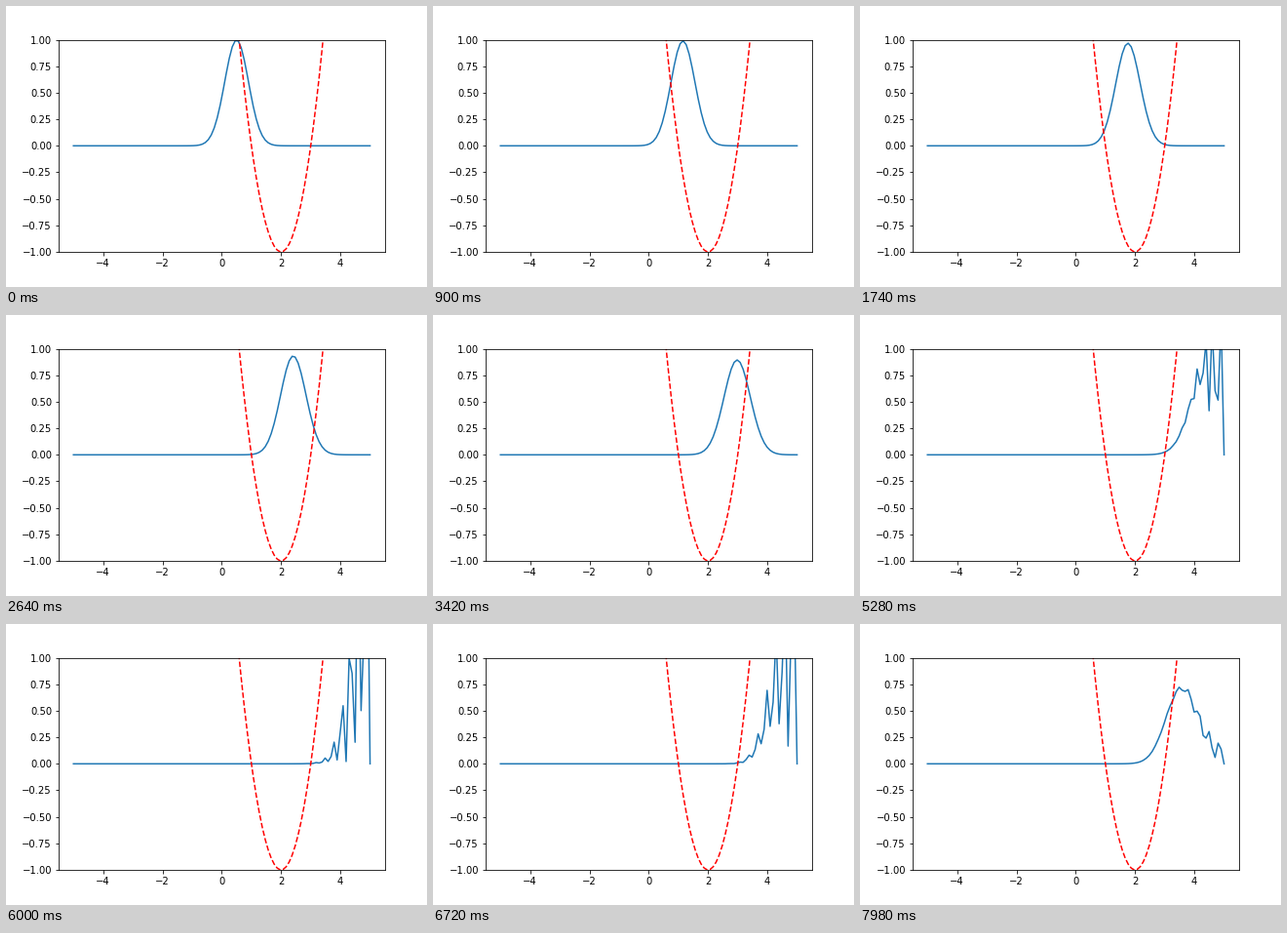
Write a matplotlib script that moves like this. It is 432x288 px and loops after 8 s.

```python
import numpy as np
import matplotlib.pyplot as plt
from matplotlib.animation import FuncAnimation

TICK = 20          # ms per animation frame
HOLD = 3           # ticks each time step stays on screen
LOOP = 8000        # ms
DT = 0.005         # simulated time per step

# Grid with hard walls at both ends
x = np.linspace(-5, 5, 100)
dx = x[1] - x[0]
V = (x - 2) ** 2 - 1

# Gaussian packet moving to the right
START, WIDTH, K = 0.5, 0.4, 11.0
psi0 = np.exp(-(x - START) ** 2 / (4 * WIDTH ** 2) + 1j * K * x)
psi0 /= np.sqrt(np.sum(np.abs(psi0) ** 2) * dx)

# Finite-difference Hamiltonian on the interior points
n = len(x) - 2
H = (np.diag(np.full(n, 1 / dx ** 2) - V[1:-1])
     - np.diag(np.full(n - 1, 0.5 / dx ** 2), 1)
     - np.diag(np.full(n - 1, 0.5 / dx ** 2), -1))
energy, modes = np.linalg.eigh(H)
coeff = modes.T @ psi0[1:-1]


def density(t):
    rho = np.zeros(len(x))
    rho[1:-1] = np.abs(modes @ (coeff * np.exp(-1j * energy * t))) ** 2
    return rho


fig, ax = plt.subplots(figsize=(6, 4), dpi=72)
fig.subplots_adjust(left=0.125, right=0.9, bottom=0.125, top=0.88)
line, = ax.plot(x, density(0))
ax.plot(x, V, "r--")
ax.set_ylim(-1, 1)


def update(i):
    line.set_ydata(density(i // HOLD * DT))
    return line,


anim = FuncAnimation(fig, update, frames=LOOP // TICK, interval=TICK,
                     repeat=True, repeat_delay=0, blit=False)
plt.show()
```
